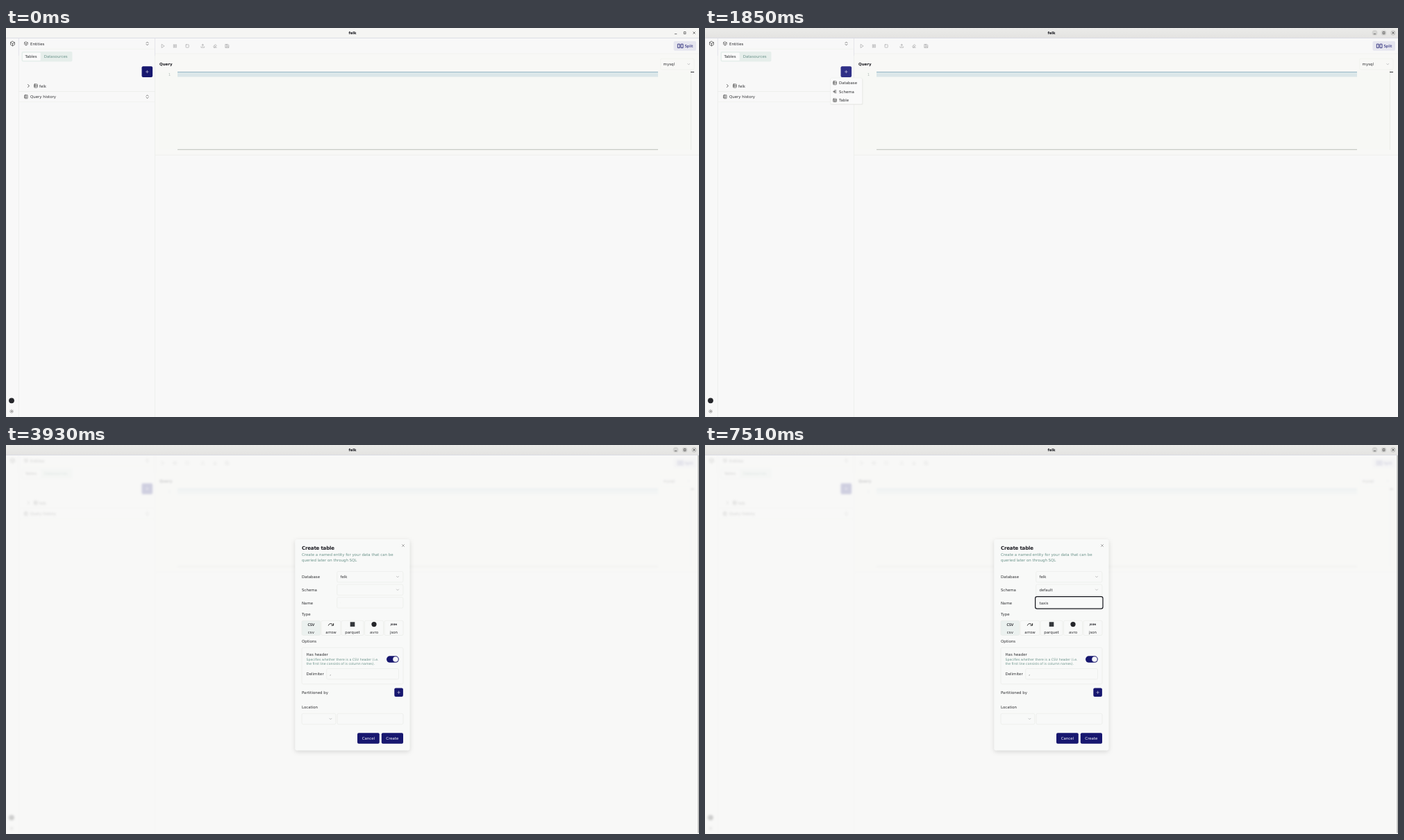
These frames come from a looping animation (998 px wide and 561 px high, 8000 ms). An HTML page:

```html
<!DOCTYPE html>
<html lang="en">
<head>
<meta charset="utf-8">
<title>Create table</title>
<style>
html, body { margin: 0; width: 100%; height: 100%; overflow: hidden; background: #f8f8f8; }
svg, .veil { position: absolute; left: 0; top: 0; width: 998px; height: 561px; }
text { font: 5.46px "DejaVu Sans", sans-serif; fill: #303134; text-rendering: geometricPrecision; white-space: pre; }
.bold { font-weight: 700; fill: #1c1c22; }
.muted { fill: #6c948b; }
.small { font-size: 4.68px; }
.mid { text-anchor: middle; }
.white { fill: #f4f4fb; }
.navy { fill: #17176f; }
.ico { fill: none; stroke: #333; stroke-width: 2; stroke-linecap: round; stroke-linejoin: round; }
.gray { stroke: #8f9091; }
.edge { fill: none; stroke: #e5e7e2; stroke-width: .5; }
.soft { stroke: #edeee9; }

/* everything runs on one 8 s clock: 1% = 80 ms */
.veil { top: 14.5px; height: 546.5px; background: rgba(248,248,247,.8); backdrop-filter: blur(1.8px); }
.veil, .a { animation: 8s linear infinite both; }
.veil { animation-name: veil; }
.focus { animation-name: focus; }
.hover { animation-name: hover; }
.bar { animation-name: bar; animation-timing-function: step-end; }
.menu { animation-name: menu; transform-origin: 203px 72px; }
.dialog { animation-name: dialog; transform-origin: 499px 288px; }
.pick1 { animation-name: pick1; transform-origin: 524px 208px; }
.pick2 { animation-name: pick2; transform-origin: 524px 227px; }
.val1, .val2, .ring, .type, .caret { animation-timing-function: step-end; }
.val1 { animation-name: val1; }
.val2 { animation-name: val2; }
.ring { animation-name: ring; }
.type { animation-name: type; }
.caret { animation-name: caret; }

@keyframes focus { 0%, 11% { opacity: 0; } 14.8%, 100% { opacity: 1; } }
@keyframes hover { 0%, 11.2% { fill: #17176f; } 13.2%, 100% { fill: #2f2f87; } }
@keyframes bar {
  0% { opacity: 0; } 5.4% { opacity: 1; } 17.1% { opacity: 0; } 30% { opacity: 1; }
  41.12% { opacity: 0; } 49.12% { opacity: 1; } 55% { opacity: 0; } 66.87%, 100% { opacity: 1; }
}
@keyframes menu {
  0%, 17.1% { opacity: 0; transform: translateY(-3.1px) scale(.95); animation-timing-function: ease; }
  19%, 29.4% { opacity: 1; transform: none; animation-timing-function: ease; }
  31.3%, 100% { opacity: 0; transform: scale(.95); }
}
@keyframes veil { 0%, 29.95% { opacity: 0; } 32.7%, 100% { opacity: 1; } }
@keyframes dialog {
  0%, 29.85% { opacity: 0; transform: translateY(2.5px) scale(.95); animation-timing-function: ease; }
  32.5%, 100% { opacity: 1; transform: none; }
}
@keyframes pick1 {
  0%, 41.11% { opacity: 0; transform: translateY(-2px) scale(.965); }
  41.12% { opacity: .33; transform: translateY(-2px) scale(.965); animation-timing-function: ease-out; }
  42.8%, 49.11% { opacity: 1; transform: none; }
  49.12%, 100% { opacity: 0; transform: none; }
}
@keyframes pick2 {
  0%, 54.99% { opacity: 0; transform: translateY(-2px) scale(.965); }
  55% { opacity: .33; transform: translateY(-2px) scale(.965); animation-timing-function: ease-out; }
  56.8%, 66.86% { opacity: 1; transform: none; }
  66.87%, 100% { opacity: 0; transform: none; }
}
@keyframes val1 { 0% { opacity: 0; } 49.12%, 100% { opacity: 1; } }
@keyframes val2 { 0% { opacity: 0; } 66.87%, 100% { opacity: 1; } }
@keyframes ring { 0% { opacity: 0; } 69.86%, 100% { opacity: 1; } }
@keyframes type {
  0% { transform: none; } 78.37% { transform: translateX(2.1px); } 80.5% { transform: translateX(5.5px); }
  84% { transform: translateX(8.7px); } 85.1% { transform: translateX(10.2px); }
  86.25%, 100% { transform: translateX(13.1px); }
}
@keyframes caret {
  0% { opacity: 0; } 69.86% { opacity: 1; } 77.5% { opacity: 0; } 78.37% { opacity: 1; } 93.86%, 100% { opacity: 0; }
}
</style>
</head>
<body>
<svg viewBox="0 0 998 561">
  <defs>
    <linearGradient id="head" x2="0" y2="1"><stop stop-color="#ebebe9"/><stop offset="1" stop-color="#e4e3e1"/></linearGradient>
    <path id="cube" d="M12 2 21 7v10l-9 5-9-5V7zM3.3 7 12 12l8.700-5M12 22V12"/>
    <path id="updown" d="m7 15 5 5 5-5M7 9l5-5 5 5"/>
    <path id="down" d="m6 9 6 6 6-6"/>
    <path id="plus" d="M5 12h14M12 5v14"/>
    <path id="cross" d="m6 6 12 12M18 6 6 18"/>
    <g id="book"><rect x="4" y="2" width="16" height="20" rx="2"/><path d="M2 7h4M2 12h4M2 17h4M10 7h6M10 12h6M10 17h6"/></g>
    <g id="table"><rect x="3" y="3" width="18" height="18" rx="2"/><path d="M3 9h18M3 15h18M12 9v12"/></g>
    <g id="drawer"><rect x="3" y="2" width="18" height="20" rx="3"/><path d="M3 9h18M3 15h18M7 6h2M7 12h2M7 18h2"/></g>
    <g id="branch"><circle cx="6" cy="12" r="3"/><path d="M9 12h11M12 5h8M12 19h8M12 5v14"/></g>
  </defs>

  <rect width="998" height="561" fill="#f8f8f8"/>
  <rect x="215" y="37" width="783" height="146" fill="#f8f8f6"/>

  <!-- title bar -->
  <rect width="998" height="14.3" fill="#f5f5f3"/>
  <g class="a focus">
    <rect width="998" height="14.3" fill="url(#head)"/>
    <g fill="#d3d3d1"><circle cx="964.5" cy="7" r="3.9"/><circle cx="977.5" cy="7" r="3.9"/><circle cx="991" cy="7" r="3.9"/></g>
  </g>
  <text class="bold mid" x="499" y="9" style="font-size:5.3px">felk</text>
  <g fill="none" stroke="#444" stroke-width=".7">
    <path d="M962.8 8.6h3.4M989.4 5.4l3.2 3.2M992.6 5.4l-3.2 3.2"/><rect x="976.2" y="5.7" width="2.7" height="2.7"/>
  </g>
  <path d="M0 14.5H998" stroke="#d5d6e0" stroke-width=".8"/>

  <!-- side rail and entity panel -->
  <path class="edge" d="M.4 15V561M18.4 15V561M214.5 15V561M18.5 91.5H214.5M215 183.3H998"/>
  <path class="edge soft" d="M215 37H998M18.5 30.4H214.5M18.5 106.5H214.5"/>
  <path d="M18.4 15V40M214.5 15V40" stroke="#dcdce8" stroke-width=".6"/>
  <g class="ico">
    <use href="#cube" transform="translate(5.6 18.6) scale(.325)"/>
    <use href="#cube" transform="translate(25.8 19.3) scale(.26)"/>
    <use href="#updown" transform="translate(199.9 18.9) scale(.3)"/>
    <use href="#updown" transform="translate(199.9 95.5) scale(.3)"/>
    <use href="#book" transform="translate(25.9 96) scale(.26)"/>
    <use href="#drawer" transform="translate(39.8 80.3) scale(.26)"/>
    <path d="m9 6 6 6-6 6" transform="translate(28.7 79.7) scale(.315)" stroke-width="2.6"/>
    <g transform="translate(4.9 549.7) scale(.26)" stroke="#555">
      <circle cx="12" cy="12" r="4"/><path d="M12 2v2M12 20v2M2 12h2M20 12h2M5 5l1.4 1.4M17.6 17.6 19 19M5 19l1.4-1.4M17.6 6.4 19 5"/>
    </g>
  </g>
  <circle cx="8" cy="537.3" r="3.9" fill="#25262a"/>
  <text x="35" y="24.5">Entities</text>
  <rect x="22.5" y="34" width="73" height="14.5" rx="2" fill="#e6eeeb"/>
  <rect x="24" y="35.5" width="25.8" height="11.5" rx="1.2" fill="#fafafa"/>
  <text x="27.6" y="43.3">Tables</text>
  <text class="muted" x="54.7" y="43.3">Datasources</text>
  <rect class="a hover" x="195.5" y="55.3" width="15.6" height="15.6" rx="2"/>
  <use href="#plus" class="ico" style="stroke:#f4f4fb" transform="translate(200.2 60) scale(.26)"/>
  <text x="48" y="85.5">felk</text>
  <text x="35" y="101.1">Query history</text>

  <!-- toolbar -->
  <g class="ico gray">
    <path d="M6 3 20 12 6 21z" transform="translate(222.9 22.9) scale(.26)"/>
    <path d="M5 4h4v16H5zM15 4h4v16h-4z" transform="translate(240.4 22.9) scale(.26)"/>
    <rect x="4" y="4" width="16" height="16" rx="2" transform="translate(258 22.9) scale(.26)"/>
    <path d="M3 16v5h18v-5M7 8l5-5 5 5M12 3v13" transform="translate(280.2 22.7) scale(.26)"/>
    <path d="m7 21-4-5L14 4l7 6L10 21zM8 11l8 6M7 21h14" transform="translate(297.8 22.7) scale(.26)"/>
    <path d="M3 3h14l4 4v14H3zM7 21v-8h10v8M7 3v5h8" transform="translate(315.4 22.9) scale(.26)"/>
  </g>
  <rect x="961.5" y="19" width="32.5" height="13.8" rx="2" fill="#e6e6ef"/>
  <path d="M967.3 23.2h3v5.4h-3zM972 23.2h3v5.4h-3z" fill="none" stroke="#17176f" stroke-width=".8"/>
  <text class="navy" x="977.4" y="28">Split</text>

  <!-- editor -->
  <text class="bold" x="221" y="54.2">Query</text>
  <rect class="edge soft" x="942.5" y="44.3" width="48.5" height="15.6" rx="2"/>
  <text x="946.6" y="54.2">mysql</text>
  <use href="#down" class="ico gray" transform="translate(980.2 49.2) scale(.25)"/>
  <rect x="221" y="63" width="766" height="112.6" fill="#f7f8f5"/>
  <rect x="247" y="63.5" width="692" height="7" fill="#dbe7e9"/>
  <path d="M247 63.5H939" stroke="#84aabb" stroke-width=".8"/>
  <path d="M247 175.3H939" stroke="#a3aaa0" stroke-width=".7"/>
  <path d="M986.5 60V176" stroke="#e6e9e1" stroke-width=".7"/>
  <path d="M986 63.6h5" stroke="#2a2c31" stroke-width="1"/>
  <text x="233.7" y="68.7" style="font-family:'DejaVu Sans Mono',monospace;fill:#b4bfba">1</text>

  <!-- add menu -->
  <g class="a menu">
    <rect x="180.5" y="73" width="47" height="38" rx="2" fill="#dfe0dd" opacity=".5"/>
    <rect x="180.5" y="72" width="46" height="37.8" rx="2" fill="#fafafa" stroke="#e5e7e2" stroke-width=".4"/>
    <g class="ico">
      <use href="#drawer" transform="translate(183.9 76.1) scale(.26)"/>
      <use href="#branch" transform="translate(183.9 88.6) scale(.26)"/>
      <use href="#table" transform="translate(183.9 101.1) scale(.26)"/>
    </g>
    <text x="193" y="81.3">Database</text><text x="193" y="93.8">Schema</text><text x="193" y="106.3">Table</text>
  </g>
</svg>

<div class="veil"></div>

<svg viewBox="0 0 998 561">
  <rect class="a bar" x="996.2" y="15" width="1.8" height="544.5" fill="#bbbcbb"/>

  <g class="a dialog">
    <rect x="416.3" y="136" width="165.2" height="304.5" rx="3" fill="#f8f9f8" style="filter:drop-shadow(0 2px 3px rgba(0,0,0,.13))"/>
    <text class="bold" x="426" y="150.7" style="font-size:7.02px;letter-spacing:-.175px">Create table</text>
    <text class="muted" x="426" y="160.2">Create a named entity for your data that can be</text>
    <text class="muted" x="426" y="168">queried later on through SQL</text>
    <use href="#cross" class="ico" style="stroke:#666" transform="translate(568.9 141.9) scale(.26)"/>

    <text x="426" y="192.2">Database</text><text x="426" y="210.9">Schema</text><text x="426" y="229.6">Name</text>
    <g class="edge">
      <rect x="476.7" y="182.4" width="95.2" height="15.5" rx="2"/>
      <rect x="476.7" y="201.1" width="95.2" height="15.5" rx="2"/>
      <rect x="476.7" y="219.6" width="95.2" height="15.5" rx="2"/>
    </g>
    <use href="#down" class="ico gray" transform="translate(560.9 187) scale(.26)"/>
    <use href="#down" class="ico gray" transform="translate(560.9 205.7) scale(.26)"/>
    <text class="a val1" x="481.5" y="192.2">felk</text>
    <text class="a val2" x="481.5" y="210.9">default</text>

    <text x="481.5" y="229.6">taxis</text>
    <g class="a type">
      <rect x="481.2" y="222" width="20" height="11" fill="#f8f9f8"/>
      <rect class="a caret" x="481.5" y="224" width=".6" height="7" fill="#222"/>
    </g>
    <rect class="a ring" x="475.6" y="218.6" width="97.4" height="17.5" rx="2.6" fill="none" stroke="#17181f" stroke-width="1.2"/>

    <text x="426" y="246.3">Type</text>
    <rect x="426" y="253.3" width="26.8" height="21.2" rx="2" fill="#ebf1ef"/>
    <g class="edge">
      <rect x="426" y="253.3" width="26.8" height="21.2" rx="2"/>
      <rect x="454" y="253.3" width="28" height="21.2" rx="2"/>
      <rect x="483" y="253.3" width="32" height="21.2" rx="2"/>
      <rect x="516.5" y="253.3" width="27" height="21.2" rx="2"/>
      <rect x="545" y="253.3" width="27" height="21.2" rx="2"/>
    </g>
    <text class="bold mid" x="439.4" y="260.5" style="font:700 5.2px Lato,sans-serif">CSV</text>
    <path d="M464.3 260.5c.8-3.6 4.8-3.6 6.6-1M471.6 257.2v3h-3" fill="none" stroke="#222" stroke-width="1"/>
    <rect x="495.7" y="255.3" width="6.6" height="6.6" fill="#33363a"/>
    <circle cx="530" cy="258.6" r="3.6" fill="#25262a"/>
    <text class="bold mid" x="558.5" y="259.9" style="font-size:3.4px">JSON</text>
    <g class="mid">
      <text x="439.4" y="272">csv</text><text x="468" y="272">arrow</text><text x="499" y="272">parquet</text>
      <text x="530" y="272">avro</text><text x="558.5" y="272">json</text>
    </g>

    <text x="426" y="285.3">Options</text>
    <rect class="edge" x="426" y="292.2" width="146" height="52.6" rx="2"/>
    <text x="432.5" y="303.5">Has header</text>
    <text class="muted small" x="432.5" y="310.7">Specifies whether there is a CSV header (i.e.</text>
    <text class="muted small" x="432.5" y="317.2">the first line consists of is column names).</text>
    <rect class="navy" x="548" y="304.3" width="17.8" height="9.5" rx="4.75"/>
    <circle cx="561" cy="309.05" r="3.8" fill="#f8f8f8"/>
    <text x="432.5" y="332">Delimiter</text>
    <rect class="edge" x="461.7" y="322.5" width="103.8" height="15.3" rx="2"/>
    <text x="466.3" y="332">,</text>

    <text x="426" y="359.1">Partitioned by</text>
    <rect class="navy" x="559.3" y="350.5" width="12.6" height="12.6" rx="2"/>
    <use href="#plus" class="ico" style="stroke:#f4f4fb" transform="translate(562.5 353.7) scale(.26)"/>
    <text x="426" y="380.4">Location</text>
    <rect class="edge" x="426" y="387.3" width="48.8" height="15.5" rx="2"/>
    <rect class="edge" x="477" y="387.3" width="95" height="15.5" rx="2"/>
    <use href="#down" class="ico gray" transform="translate(464.3 391.9) scale(.26)"/>
    <rect class="navy" x="506" y="415.2" width="31.8" height="15.6" rx="2"/>
    <rect class="navy" x="540.8" y="415.2" width="31.2" height="15.6" rx="2"/>
    <text class="mid white" x="521.9" y="425">Cancel</text>
    <text class="mid white" x="556.4" y="425">Create</text>
  </g>

  <g class="a pick1">
    <rect x="477" y="200.3" width="94.6" height="16" rx="2" fill="#fff" style="filter:drop-shadow(0 .8px 1px rgba(0,0,0,.2))"/>
    <text x="491" y="209.7">felk</text>
  </g>
  <g class="a pick2">
    <rect x="477" y="219" width="94.6" height="16" rx="2" fill="#fff" style="filter:drop-shadow(0 .8px 1px rgba(0,0,0,.2))"/>
    <text x="491" y="228.4">default</text>
  </g>
</svg>
</body>
</html>
```
